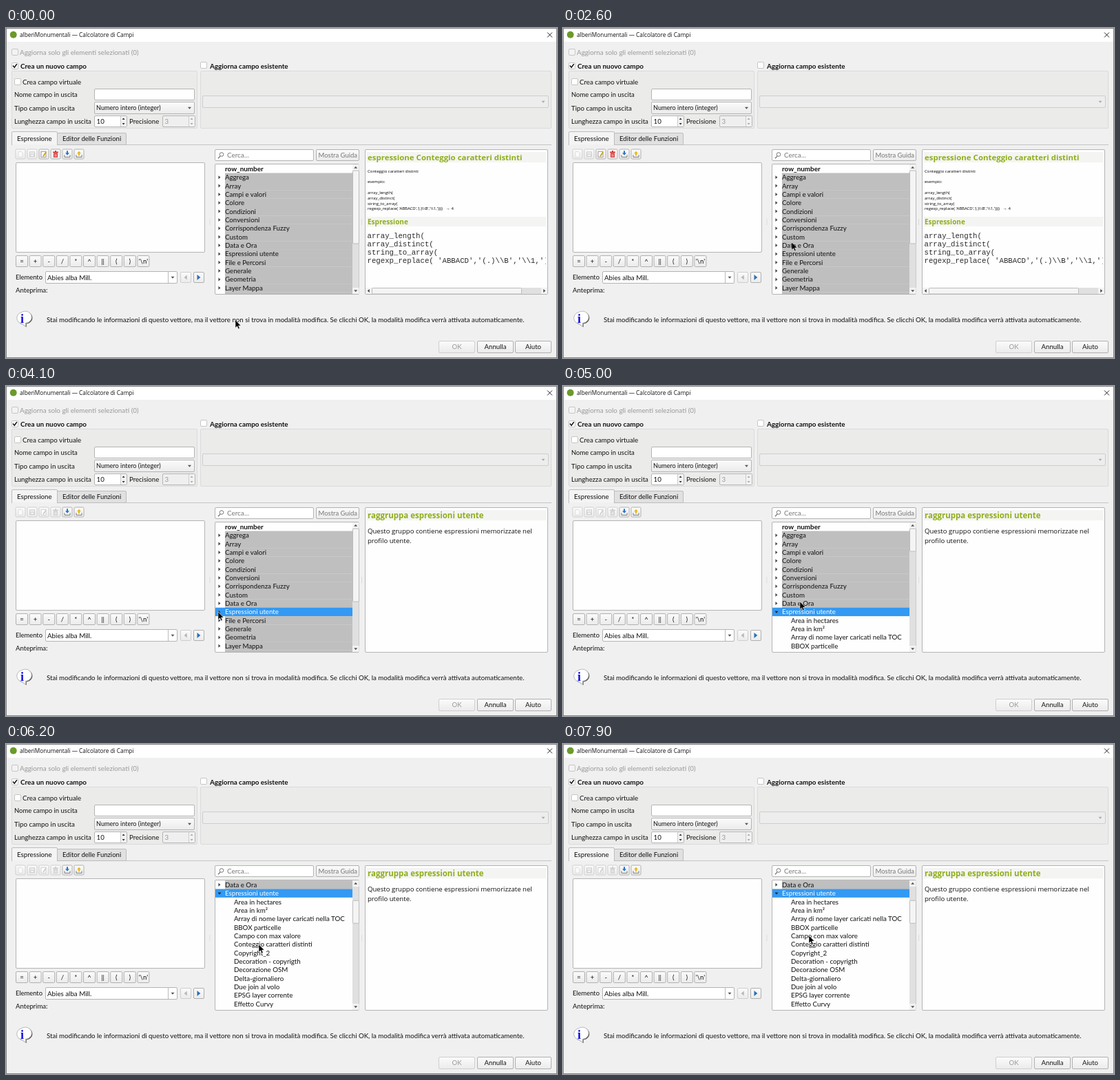
An HTML page for the animation above (8000 ms loop, 800 px wide and 479 px high).

```html
<!DOCTYPE html>
<html lang="it">
<head>
<meta charset="utf-8">
<title>Calcolatore di Campi</title>
<style>
  html, body { margin: 0; width: 100%; height: 100%; overflow: hidden; background: #eff0ef; }
  svg { display: block; width: 800px; height: 479px; }
  text { font: 9.75px Lato, sans-serif; fill: #111; white-space: pre; }
  .b { font-weight: 700; }
  .off { fill: #999; }
  .sans { font-family: "Open Sans", "Noto Sans", sans-serif; }
  .head { font-family: "Open Sans", "Noto Sans", sans-serif; font-weight: 700; fill: #8fae1b; }
  .mono { font-family: "Liberation Mono", monospace; fill: #2a2a2a; }
  .mid { text-anchor: middle; }
</style>
</head>
<body>
<svg id="stage" viewBox="0 0 800 479"></svg>
<script>
const LOOP = 8000, STEP = 100, ROW = 12.36, FIRST = 204.3;

const rect = (x, y, w, h, fill, stroke = 'none', r = 0) =>
  `<rect x="${x}" y="${y}" width="${w}" height="${h}" rx="${r}" fill="${fill}" stroke="${stroke}"/>`;
const path = (d, fill = 'none', stroke = 'none', w = 1) =>
  `<path d="${d}" fill="${fill}" stroke="${stroke}" stroke-width="${w}"/>`;
// y is the middle of the line
const text = (x, y, s, cls = '', size = 9.75, color = '') =>
  `<text x="${x}" y="${y + size * 0.36}" class="${cls}" style="font-size:${size}px${color && ';fill:' + color}">${s}</text>`;
const box = (x, y, w, h, fill = '#fff', stroke = '#b4b4b4') => rect(x + .5, y + .5, w - 1, h - 1, fill, stroke, 1.5);
const button = (x, y, w, h, label = '', cls = '') =>
  box(x, y, w, h, 'url(#face)', cls.includes('off') ? '#cfcfcf' : '#b0b0b0') + text(x + w / 2, y + h / 2, label, 'mid ' + cls, 9.6);
const down = (x, y, color = '#555', s = 2.5) => path(`M${x - s} ${y - s / 2}h${2 * s}l${-s} ${s * 1.2}z`, color);
const up = (x, y, color = '#555', s = 2.5) => path(`M${x - s} ${y + s / 2}h${2 * s}l${-s} ${-s * 1.2}z`, color);
const right = (x, y, color = '#444', s = 2.5) => path(`M${x - s / 2} ${y - s}v${2 * s}l${s * 1.2} ${-s}z`, color);
const left = (x, y, color = '#444', s = 2.5) => path(`M${x + s / 2} ${y - s}v${2 * s}l${-s * 1.2} ${-s}z`, color);

function checkbox(x, y, checked, off) {
  return box(x, y, 10, 10, off ? '#f3f3f3' : '#fff', '#c6c6c6') +
    (checked ? path(`M${x + 2} ${y + 4.6}l2.2 2.6l3.6 -5`, 'none', '#111', 1.5) : '');
}

function spin(x, value, off) {
  const c = off ? '#aaa' : '#333';
  return box(x, 127, 48, 17, off ? '#efefef' : '#fff') + rect(x + 38, 128, 9, 15, '#f2f2f2') +
    path(`M${x + 38.5} 128v15`, 'none', '#ccc') + up(x + 42.6, 132, c, 2) + down(x + 42.6, 139, c, 2) +
    text(x + 3.5, 135.5, value, off ? 'off' : '');
}

function fieldArea() {
  return checkbox(8, 30, false, true) + text(20, 35.5, 'Aggiorna solo gli elementi selezionati (0)', 'off', 9.82) +
    checkbox(8, 50, true) + text(21, 55, 'Crea un nuovo campo', 'b', 9.95) +
    checkbox(282, 49, false) + text(296, 55, 'Aggiorna campo esistente', 'b', 9.9) +
    box(8, 62, 270, 84, '#ebecea', '#dadada') + box(282, 62, 510, 84, '#ebecea', '#dadada') +
    checkbox(12, 73, false) + text(24, 78, 'Crea campo virtuale') +
    text(12, 97, 'Nome campo in uscita', '', 9.45) + box(128, 88, 146, 17) +
    text(12, 116, 'Tipo campo in uscita') + box(128, 107, 146, 18, 'url(#face)') +
    text(131, 116, 'Numero intero (integer)', '', 9.15) + down(266.5, 116) +
    text(12, 135.5, 'Lunghezza campo in uscita', '', 9.6) + spin(128, '10') +
    text(179, 135.5, 'Precisione', '', 9.6) + spin(227, '3', true) +
    box(285, 98, 503, 18, '#ededed', '#cdcdcd') + down(780, 107, '#aaa');
}

function tabs() {
  return path('M8 169.5H792', 'none', '#c4c4c4') +
    box(74, 152, 101, 18, '#e0e1e0', '#bdbdbd') + text(82, 161, 'Editor delle Funzioni', '', 9.55) +
    box(8, 150, 67, 21, '#f3f4f3', '#bdbdbd') + rect(9, 169, 65, 3, '#eff0ef') + text(16, 160.5, 'Espressione');
}

function editor() {
  const ops = ['=', '+', '-', '/', '*', '^', '||', '(', ')', "'\\n'"];
  return box(14, 195, 275, 131, '#fdfefd') +
    ops.map((op, i) => button(14 + i * 19.6, 330, 18, 17, op)).join('') +
    text(14, 362, 'Elemento', '', 9.4) + box(57, 353, 192, 18) + path('M235.5 354v16', 'none', '#bbb') +
    text(60, 362, 'Abies alba Mill.') + down(242, 362) +
    button(253, 354, 16, 16, '', 'off') + left(261, 362, '#b8b8b8', 3.5) +
    button(272, 354, 16, 16) + right(279.5, 362, '#2f6fb4', 4) +
    text(14, 381, 'Anteprima:', '', 9.6);
}

function toolbar(active) {
  const grey = '#cfcfcf', tone = c => active ? c : grey;
  const icons = [
    path('M-3 -4h4l2 2v6h-6z', '#fafafa', '#ddd'),
    rect(-3.5, -3.5, 7, 7, '#ececec', grey) + rect(-2, 0, 4, 3, '#fff', grey),
    rect(-4, -4, 7, 8, '#fff', tone('#999')) + path('M-1 3l4 -6', 'none', tone('#d6a21a'), 2),
    rect(-3, -2, 6, 6.5, tone('#dd3434')) + path('M-4 -3h8M-1 -4.5h2', 'none', tone('#dd3434'), 1.5) + path('M-1 -.5v4M1 -.5v4', 'none', '#fff', .8),
    path('M-4 1v3h8v-3', '#f6f6f6', '#777') + path('M-1 -5h2v3h2l-3 3.5l-3 -3.5h2z', '#2c74c9'),
    path('M-4 1v3h8v-3', '#f6f6f6', '#777') + path('M-1 2h2v-3h2l-3 -3.5l-3 3.5h2z', '#e6b619')
  ];
  return icons.map((icon, i) => {
    const off = i < 2 || (i < 4 && !active);
    return button(13.5 + i * 17, 175.5, 15, 15, '', off ? 'off' : '') + `<g transform="translate(${21 + i * 17} 183.3)">${icon}</g>`;
  }).join('');
}

function infoIcon() {
  const bubble = 'M23 412.5a9.2 8.6 0 1 1 5.5 15.8v5l-5.5 -4a9.2 8.6 0 0 1 0 -16.8z';
  return `<g transform="translate(1.2 1)">${path(bubble, '#555')}</g>` + path(bubble, '#fff', '#aaa', .8) +
    `<text x="23.5" y="427.5" class="mid" style="font:700 18px 'Liberation Serif',serif;fill:#1010e0">i</text>`;
}

function frame() {
  return rect(0, 0, 800, 479, '#eff0ef') + rect(0, 0, 800, 20, '#fff') +
    '<circle cx="10.7" cy="9.7" r="5" fill="#6b9a2b"/>' +
    text(20, 10.3, 'alberiMonumentali — Calcolatore di Campi', 'sans', 8.28) +
    path('M786 6.5l7 7M793 6.5l-7 7', 'none', '#222') +
    fieldArea() + tabs() + editor() +
    box(303, 176, 144, 17) + '<circle cx="313" cy="183.5" r="2.8" fill="none" stroke="#777"/>' +
    path('M311 186l-3 3.2', 'none', '#777', 1.3) + text(321, 184.7, 'Cerca...', '', 9.9, '#777') +
    button(450, 176, 63, 17) + text(453.5, 184.7, 'Mostra Guida', '', 9.5, '#777') +
    path('M296 277v9M516.5 277v9', 'none', '#ddd') + infoIcon() +
    text(59, 424, 'Stai modificando le informazioni di questo vettore, ma il vettore non si trova in modalità modifica. Se clicchi OK, la modalità modifica verrà attivata automaticamente.', '', 9.69) +
    button(628, 454, 53, 18, 'OK', 'off') + button(684, 454, 53, 18, 'Annulla') + button(739, 454, 53, 18, 'Aiuto') +
    rect(.5, .5, 799, 478, 'none', '#858585');
}

const groups = ['Aggrega', 'Array', 'Campi e valori', 'Colore', 'Condizioni', 'Conversioni', 'Corrispondenza Fuzzy',
  'Custom', 'Data e Ora', 'Espressioni utente', 'File e Percorsi', 'Generale', 'Geometria', 'Layer Mappa', 'Mappe'];
const saved = ['Area in hectares', 'Area in km²', 'Array di nome layer caricati nella TOC', 'BBOX particelle',
  'Campo con max valore', 'Conteggio caratteri distinti', 'Copyright_2', 'Decoration - copyrigth', 'Decorazione OSM',
  'Delta-giornaliero', 'Due join al volo', 'EPSG layer corrente', 'Effetto Curvy', 'Esporta tabella collegata'];
const USER_GROUP = 'Espressioni utente';

function tree({ selected, open, top }) {
  const rows = ['row_number', ...groups];
  if (open) rows.splice(rows.indexOf(USER_GROUP) + 1, 0, ...saved);
  const body = rows.slice(top, top + 16).map((name, i) => {
    const y = FIRST + i * ROW, start = y - ROW / 2;
    if (name === 'row_number') return text(318, y, name, 'b', 9.9);
    if (saved.includes(name)) return text(331, y, name);
    const hit = selected && name === USER_GROUP;
    const back = hit ? rect(304, start, 199, ROW, '#3399f3') : rect(318, start, 185, ROW + .2, '#bebfbe');
    const mark = open && name === USER_GROUP ? down(310, y, '#222') : right(309.7, y);
    return back + mark + text(318, y, name, '', 9.7, hit ? '#fff' : '');
  }).join('');
  const thumbY = 207 + top * 2.25, thumbH = open ? 33 : 106;
  return box(303, 197, 210, 190, '#fdfefd') + `<g clip-path="url(#list)">${body}</g>` +
    rect(503, 198, 9.5, 188, '#dfe0df') + rect(503, 198, 9.5, 9, '#f3f3f3') + rect(503, 377, 9.5, 9, '#f3f3f3') +
    up(507.7, 202.5) + down(507.7, 381.5) + rect(503.5, thumbY, 9, thumbH, '#f4f4f4', '#bbb', 1);
}

function help(selected) {
  const panel = box(521, 176, 266, 211, '#fdfefd') + rect(524, 180, 260, 15, '#f4f5f2');
  if (selected) return panel + text(525, 187.5, 'raggruppa espressioni utente', 'head', 11.5) +
    text(525, 211, 'Questo gruppo contiene espressioni memorizzate nel', 'sans', 9.58) +
    text(525, 224.5, 'profilo utente.', 'sans', 9.58);
  const code = ['array_length(', 'array_distinct(', 'string_to_array('];
  const call = "regexp_replace( 'ABBACD','(.)\\\\B','\\\\1,'";
  const small = (y, s) => text(525, y, s, 'sans', 6, '#000');
  return panel + text(525, 187.5, 'espressione Conteggio caratteri distinti', 'head', 11.45) +
    small(208, 'Conteggio caratteri distinti') + small(223, 'esempio:') +
    code.map((s, i) => small(239 + i * 7.7, s)).join('') + small(262, call + '))))   → 4') +
    rect(524, 274, 260, 14, '#f4f5f2') + text(525, 281, 'Espressione', 'head', 10) +
    '<g clip-path="url(#help)">' + [...code, call + '))))'].map((s, i) => text(524.5, 300.9 + i * 12, s, 'mono', 10.7)).join('') + '</g>' +
    rect(522, 377, 264, 9, '#dfe0df') + rect(522, 377, 9, 9, '#f3f3f3') + rect(777, 377, 9, 9, '#f3f3f3') +
    left(526.5, 381.5) + right(781.5, 381.5) + rect(531.5, 377.5, 217, 8.5, '#f4f4f4', '#bbb', 1);
}

const stage = document.getElementById('stage');
stage.innerHTML = `<defs>
  <linearGradient id="face" x2="0" y2="1"><stop stop-color="#fbfbfb"/><stop offset="1" stop-color="#ebebeb"/></linearGradient>
  <clipPath id="list"><rect x="304" y="198" width="199" height="188"/></clipPath>
  <clipPath id="help"><rect x="522" y="290" width="261.5" height="86"/></clipPath></defs>
  ${frame()}<g id="state"></g>
  <path id="pointer" d="M0 0V11.2L2.6 8.8L4.4 12.8L6.2 12L4.5 8.1H8Z" fill="#000" stroke="#fff" stroke-width=".5"/>`;
const stateLayer = document.getElementById('state'), pointer = document.getElementById('pointer');

// time, x, y of the pointer tip
const route = [[0, 333, 424], [200, 333, 424], [1200, 321, 255], [1500, 321, 255], [2400, 332, 311], [2700, 332, 311],
  [3100, 342, 327], [3400, 342, 327], [3900, 308, 328], [4400, 308, 328], [4900, 344, 313], [5300, 344, 313],
  [6100, 367, 291], [6500, 367, 291], [7400, 357, 278], [8000, 357, 278]];

function pointerAt(t) {
  const i = route.findIndex(p => p[0] > t);
  const [t0, x0, y0] = route[i - 1], [t1, x1, y1] = route[i];
  const u = (t - t0) / (t1 - t0), e = u * u * (3 - 2 * u);
  return [x0 + (x1 - x0) * e, y0 + (y1 - y0) * e];
}

let shown = '';
function draw(time) {
  const t = Math.floor(time % LOOP / STEP) * STEP;
  const state = { selected: t >= 3200, open: t >= 4300, top: 3 * [5500, 5700, 5900].filter(s => t >= s).length };
  const key = JSON.stringify(state);
  if (key !== shown) {
    stateLayer.innerHTML = toolbar(!state.selected) + tree(state) + help(state.selected);
    shown = key;
  }
  pointer.setAttribute('transform', `translate(${pointerAt(t)})`);
}

const begin = performance.now();
function tick() {
  draw(performance.now() - begin);
  requestAnimationFrame(tick);
}
tick();
</script>
</body>
</html>
```
